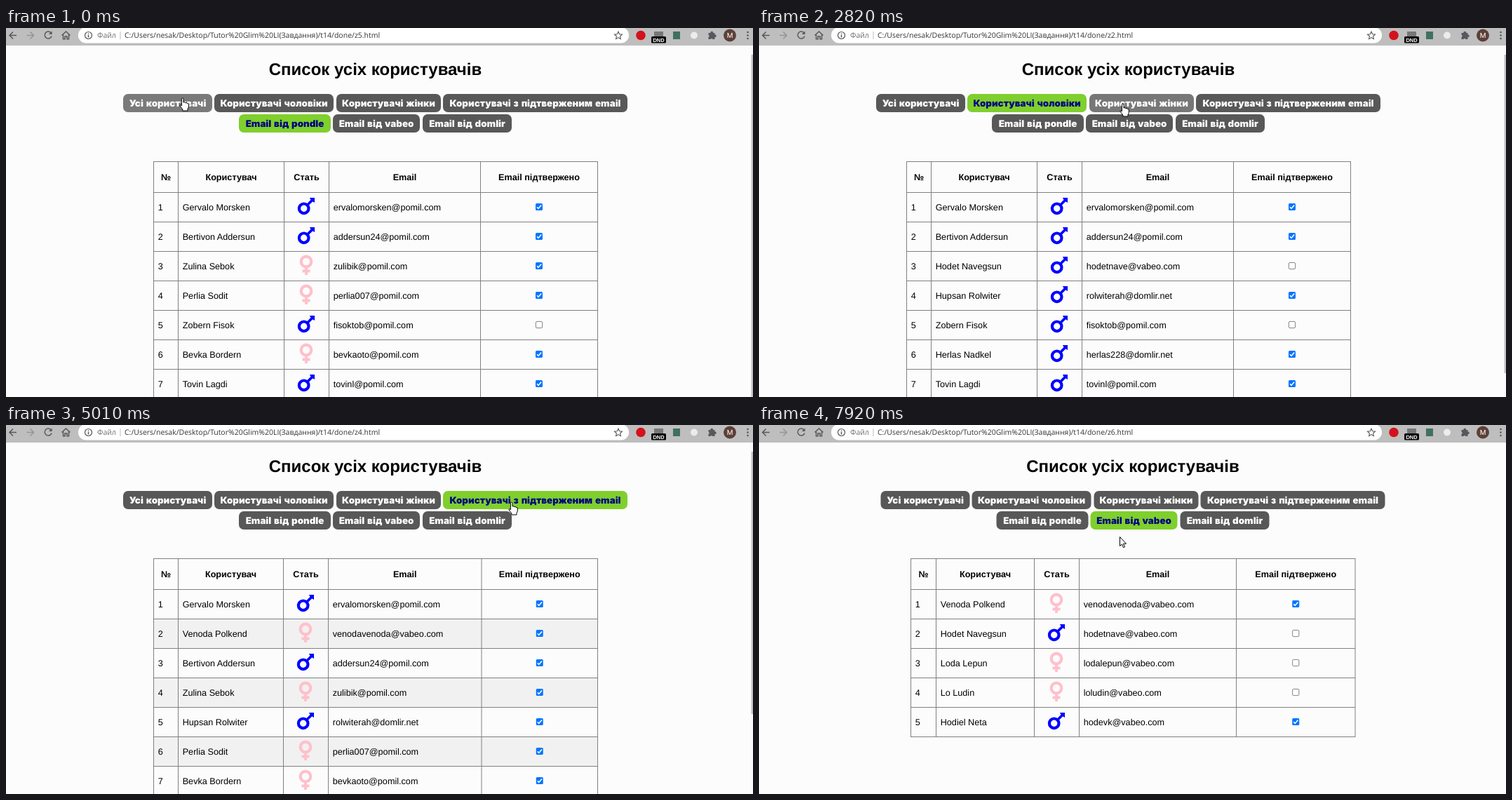
These frames come from a looping animation (1065 by 526 pixels, 8 s). An HTML page:

```html
<!DOCTYPE html>
<html lang="uk">
<head>
<meta charset="utf-8">
<title>Список усіх користувачів</title>
<style>
html, body { margin: 0; width: 100%; height: 100%; overflow: hidden; background: #fcfcfc; }
svg { display: block; width: 100%; height: 100%; }
text { font: 12.65px "Liberation Sans", Arial, sans-serif; text-rendering: geometricPrecision; }
.mid { text-anchor: middle; }
.head { font-weight: 700; }
.title { font-size: 24px; font-weight: 700; }
.btn { font: 900 13.35px Inter, "Open Sans", sans-serif; word-spacing: 1.2px; }
.url { font: 10.5px "Open Sans", "Noto Sans", sans-serif; fill: #333; }
.file { fill: #6a6d70; }
.badge { font: 700 7.5px "Liberation Sans", sans-serif; fill: #fff; }
.avatar { font: 10px Roboto, sans-serif; fill: #fff; }
.icon { fill: none; stroke: #55585c; stroke-width: 1.5; }
</style>
</head>
<body>
<svg id="stage" viewBox="0 0 1065 526" xmlns="http://www.w3.org/2000/svg"></svg>
<script>
const LOOP = 8000;
const stage = document.getElementById('stage');

// name, sex, mailbox, confirmed
const users = [
  ['Gervalo Morsken', 'm', 'ervalomorsken@pomil.com', 1],
  ['Zamisima Fusko', 'f', 'zamisima2002@domlir.net', 0],
  ['Venoda Polkend', 'f', 'venodavenoda@vabeo.com', 1],
  ['Bertivon Addersun', 'm', 'addersun24@pomil.com', 1],
  ['Hodet Navegsun', 'm', 'hodetnave@vabeo.com', 0],
  ['Zulina Sebok', 'f', 'zulibik@pomil.com', 1],
  ['Hupsan Rolwiter', 'm', 'rolwiterah@domlir.net', 1],
  ['Loda Lepun', 'f', 'lodalepun@vabeo.com', 0],
  ['Perlia Sodit', 'f', 'perlia007@pomil.com', 1],
  ['Zobern Fisok', 'm', 'fisoktob@pomil.com', 0],
  ['Bevka Bordern', 'f', 'bevkaoto@pomil.com', 1],
  ['Herlas Nadkel', 'm', 'herlas228@domlir.net', 1],
  ['Tovin Lagdi', 'm', 'tovinl@pomil.com', 1],
  ['Nebi Hadovek', 'f', 'nebih@domlir.net', 1],
  ['Lo Ludin', 'f', 'loludin@vabeo.com', 0],
  ['Hodiel Neta', 'm', 'hodevk@vabeo.com', 1]
];

const wide = [210.5, 245.5, 395.5, 459.5, 678, 843.5];
const mail = [210.5, 245.5, 396.5, 460.5, 676.5, 843.5];
const pages = {
  1: { cols: wide, thumb: 315, keep: () => true },
  2: { cols: mail, thumb: 492, keep: u => u[1] === 'm' },
  3: { cols: [210.5, 246.5, 384.5, 449.5, 673.5, 843.5], thumb: 462, keep: u => u[1] === 'f' },
  4: { cols: wide, thumb: 412, keep: u => u[3] },
  5: { cols: mail, thumb: 526, keep: u => u[2].includes('@pomil') },
  6: { cols: [216.5, 252.5, 392.5, 456.5, 680.5, 850], thumb: 0, keep: u => u[2].includes('@vabeo') }
};

// left, right, top, label
const buttons = [
  [167, 294, 94, 'Усі користувачі'],
  [297, 467, 94, 'Користувачі чоловіки'],
  [471, 620, 94, 'Користувачі жінки'],
  [623, 886, 94, 'Користувачі з підтверженим email'],
  [332, 463, 123, 'Email від pondle'],
  [466, 590, 123, 'Email від vabeo'],
  [594, 721, 123, 'Email від domlir']
];

// time, address number, shown page, loading
const visits = [
  [0, 5, 5, 0], [130, 1, 1, 0], [1920, 2, 1, 1], [2070, 2, 2, 0],
  [3410, 3, 2, 1], [3560, 3, 3, 0], [5010, 4, 4, 0], [6170, 5, 5, 0], [7770, 6, 6, 0]
];

// time, x, y of the pointer tip
const path = [
  [0, 252, 100], [280, 252, 100], [1010, 361, 108], [2070, 361, 108], [2820, 519, 108],
  [3560, 519, 108], [4120, 718, 114], [4420, 721, 110], [5160, 721, 110], [5590, 425, 105],
  [6020, 421, 131], [6630, 421, 131], [7210, 518, 135], [7340, 518, 138], [7490, 515, 152],
  [7770, 514.5, 159.5], [8000, 514.5, 159.5]
];

// moments at which the screen is refreshed: start, end, steps
const bursts = [
  [0, 0, 1], [130, 1010, 7], [1920, 2820, 7], [3410, 4120, 6], [4270, 4420, 2], [4550, 4550, 1],
  [5010, 5590, 5], [5740, 6020, 3], [6170, 6630, 4], [6760, 7210, 4], [7340, 7490, 2], [7770, 7920, 2]
];
const ticks = bursts.flatMap(([a, b, n]) =>
  Array.from({ length: n }, (_, i) => n > 1 ? a + (b - a) * i / (n - 1) : a));

const latest = (list, t) => list.filter(v => v[0] <= t + 0.01).pop();

function pointer(t) {
  const i = Math.max(1, path.findIndex(p => p[0] >= t - 0.01));
  const [t0, x0, y0] = path[i - 1], [t1, x1, y1] = path[i];
  const k = Math.min(1, Math.max(0, (t - t0) / (t1 - t0)));
  const e = k * k * (3 - 2 * k);
  return [x0 + (x1 - x0) * e, y0 + (y1 - y0) * e];
}

const hit = (x, y) => buttons.findIndex(([l, r, top]) => x >= l && x <= r && y >= top && y <= top + 26);

let lastOver = 0, glow = 1;
const states = ticks.map((t, i) => {
  const [, url, page, busy] = latest(visits, t);
  const [x, y] = pointer(t);
  const over = hit(x, y);
  if (i) glow = over === lastOver ? Math.min(1, glow + (t - ticks[i - 1]) / 300) : 0.4;
  lastOver = over;
  return { t, url, page, busy, x, y, over, glow };
});

const text = (x, y, str, cls = '', fill = '') =>
  `<text x="${x}" y="${y}" class="${cls}"${fill && ` fill="${fill}"`}>${str}</text>`;
const rect = (x, y, w, h, fill, extra = '') =>
  `<rect x="${x}" y="${y}" width="${w}" height="${h}" fill="${fill}" ${extra}/>`;
const circle = (x, y, r, fill, extra = '') =>
  `<circle cx="${x}" cy="${y}" r="${r}" fill="${fill}" ${extra}/>`;
const line = (d, extra = '') => `<path d="${d}" class="icon" ${extra}/>`;
const at = (x, y, body) => `<g transform="translate(${x} ${y})">${body}</g>`;

const male = circle(-3.3, 2.3, 6.8, 'none', 'stroke="#00f" stroke-width="4.2"') +
  '<path d="M2-3L9-10" stroke="#00f" stroke-width="3.8"/><path d="M5-13H12V-6L9.8-7.2L6.2-10.8z" fill="#00f"/>';
const female = circle(0, -6, 7.3, 'none', 'stroke="#ffc0cb" stroke-width="4.2"') +
  '<path d="M0 2V13M-5.5 7.5H5.5" stroke="#ffc0cb" stroke-width="3.8"/>';
const checked = rect(-5, -5, 10, 10, '#0075ff', 'rx="1.6"') +
  '<path d="M-3 .2L-1 2.4L3.2-2.6" fill="none" stroke="#fff" stroke-width="1.6"/>';
const empty = rect(-4.6, -4.6, 9.2, 9.2, '#fff', 'rx="1.6" stroke="#767676" stroke-width=".9"');

const outline = 'fill="#fff" stroke="#000" stroke-width="1" stroke-linejoin="round"';
const arrow = `<path d="M0 0V13L3 10.4L5 15.2L7 14.3L5 9.7H9z" ${outline}/>`;
const hand = `<path d="M-1.6 1.4Q-1.6 0-.3 0Q1 0 1 1.4V6Q2.6 5.2 3.8 6.6Q5.3 6 6.2 7.3Q8.3 7 8.3 9V12
  Q8.3 14 7 15.5V18H-.2V16L-4 11Q-4.5 8.8-1.6 10.8z" ${outline}/>`;

const reload = line('M64.3 7.2A5 5 0 1 0 65 11.5') + '<path d="M65.6 4.5V9H61z" fill="#55585c"/>';
const stop = line('M55.8 6L64.4 14.6M64.4 6L55.8 14.6');

function toolbar(s) {
  return rect(0, 0, 1065, 25, '#bebebe') +
    line('M15 10.5H5.5M10 5.5L5 10.5L10 15.5') +
    line('M29.5 10.5H39M34.5 5.5L39.5 10.5L34.5 15.5', 'opacity=".4"') +
    (s.busy ? stop : reload) +
    line('M79.5 10.5L85.5 5L91.5 10.5M81.5 9.5V15.8H84V12H87V15.8H89.5V9.5') +
    rect(103, -1, 785, 22.5, '#fff', 'rx="11"') +
    circle(117.5, 10.5, 5, 'none', 'stroke="#55585c" stroke-width="1.2"') +
    line('M117.5 9.8V13.4M117.5 7.4V8.7', 'stroke-width="1.2"') +
    text(130, 14.3, 'Файл', 'url file') + rect(162.5, 5, 1, 11, '#bbb') +
    text(169, 14.3, `C:/Users/nesak/Desktop/Tutor%20Glim%20LI(Завдання)/t14/done/z${s.url}.html`, 'url') +
    line('M873 5.2L874.6 8.8L878.5 9.2L875.6 11.8L876.4 15.6L873 13.6L869.6 15.6L870.4 11.8L867.5 9.2L871.4 8.8z',
      'style="stroke-width:1.1"') +
    circle(905, 10.5, 6.8, '#d3121c') +
    rect(924, 5, 13, 9, '#777') + rect(920, 12, 21, 9.5, '#000', 'rx="1.5"') +
    text(930.5, 19.5, 'DND', 'badge mid') +
    rect(951, 5, 10, 11, '#41705f') + circle(981, 10.5, 5, '#ececec') +
    '<path d="M1001.5 7H1004.5A1.8 1.8 0 1 1 1008 7H1010.5V9.5A1.8 1.8 0 1 1 1010.5 13V16H1007.5A1.7 1.7 0 0 0 1004.5 16H1001.5V13A1.7 1.7 0 0 0 1001.5 9.8z" fill="#55585c"/>' +
    circle(1032, 10.5, 9, '#5d4037') + text(1032, 14, 'M', 'avatar mid') +
    [6, 10.5, 15].map(y => circle(1057.5, y, 1.3, '#55585c')).join('');
}

function menu(s) {
  return buttons.map(([l, r, top, label], i) => {
    const active = i === s.page - 1;
    const grey = Math.round(88 + (i === s.over ? 34 * s.glow : 0));
    return rect(l, top, r - l, 26, active ? '#7fcf2d' : `rgb(${grey},${grey},${grey})`, 'rx="7"') +
      text((l + r) / 2, top + 17.8, label, 'btn mid', active ? '#000080' : '#fff');
  }).join('');
}

function table(s) {
  const { cols, keep } = pages[s.page];
  const rows = users.filter(keep).slice(0, 7);
  const left = cols[0], right = cols[5], bottom = 234.5 + rows.length * 42;
  const mid = i => (cols[i] + cols[i + 1]) / 2;
  // the striping of page 4 lingers in the first column of the next page
  const stripe = s.page === 4 ? right - left : s.page === 5 && s.t > 0 ? 37 : 0;
  let out = '';
  rows.forEach((u, i) => {
    const y = 255.5 + i * 42;
    if (i % 2 && stripe) out += rect(left, y - 21, stripe, 42, '#f1f1f1');
    out += text(cols[0] + 6.2, y + 4, i + 1) + text(cols[1] + 6.2, y + 4, u[0]) +
      at(mid(2) - 0.5, y - 0.5, u[1] === 'm' ? male : female) +
      text(cols[3] + 6.2, y + 4, u[2]) + at(mid(4), y - 0.5, u[3] ? checked : empty);
  });
  ['№', 'Користувач', 'Стать', 'Email', 'Email підтвержено'].forEach((h, i) => {
    out += text(mid(i), 216.6, h, 'head mid');
  });
  let d = `M${left} 190.5H${right}`;
  for (let y = 234.5; y <= bottom; y += 42) d += `M${left} ${y}H${right}`;
  cols.forEach(x => { d += `M${x} 190V${bottom + 0.5}`; });
  return out + `<path d="${d}" fill="none" stroke="#808080"/>`;
}

function draw(s) {
  const thumb = pages[s.page].thumb;
  const shift = thumb ? 0 : 6.5;
  stage.innerHTML = rect(0, 0, 1065, 526, '#fcfcfc') +
    at(shift, 0, text(526.5, 66.6, 'Список усіх користувачів', 'title mid') + menu(s)) +
    table(s) +
    (thumb ? rect(1062, 25, 3, 501, '#f9f9f9') + rect(1062.5, 38, 2.5, thumb - 38, '#c1c1c1') : '') +
    toolbar(s) + at(s.x, s.y, s.over < 0 ? arrow : hand);
}

let shown = -1;
const start = performance.now();
function tick(now) {
  const t = Math.max(0, now - start) % LOOP;
  let i = states.length - 1;
  while (i > 0 && states[i].t > t + 0.01) i--;
  if (i !== shown) draw(states[shown = i]);
  requestAnimationFrame(tick);
}
draw(states[shown = 0]);
requestAnimationFrame(tick);
</script>
</body>
</html>
```
